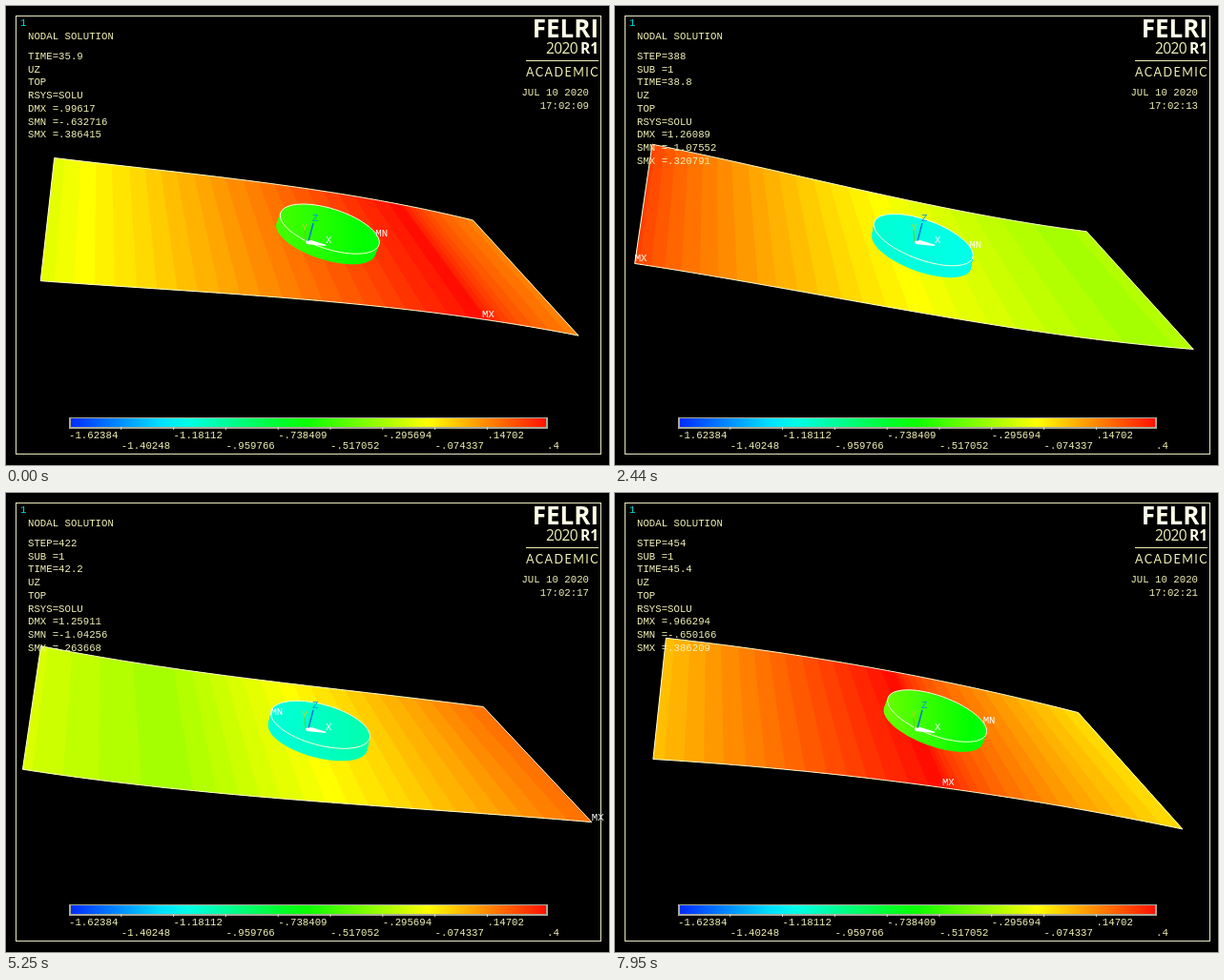
An HTML page with a canvas that plays this animation: 632x482 px, repeating every 7990 ms.

```html
<!DOCTYPE html>
<html lang="en">
<head>
<meta charset="utf-8">
<title>Nodal solution</title>
<style>
html, body { margin: 0; width: 100%; height: 100%; overflow: hidden; background: #000; }
canvas { display: block; }
</style>
</head>
<body>
<canvas id="stage" width="632" height="482"></canvas>
<script>
const ctx = document.getElementById("stage").getContext("2d");
const LOOP = 7990, STEP_MS = 83, FIRST = 359, LAST = 454;
const PERIOD = 5.1;               // wave period in solution seconds
const INK = "#f0f0b4", RIM = "#ffffd8";
const MONO = '10.7px "Liberation Mono", monospace';
const SANS = '"Open Sans", sans-serif';

const clamp = (v, a, b) => Math.max(a, Math.min(b, v));
const mix = (a, b, p) => a + (b - a) * p;
const phaseAt = step => (step - FIRST) / 10 / PERIOD * 360;

// Everything swings with one wave; each part peaks at its own phase in degrees.
function poseAt(phase) {
  const swing = (mean, size, peak) => mean + size * Math.cos((phase - peak) * Math.PI / 180);
  return {
    topLeft: [swing(43, 10.5, 317), swing(153.5, 9, 48)],
    topRight: [swing(493.5, 8.2, 120), swing(230, 7.2, 225)],
    bottomLeft: [swing(26, 14, 317), swing(281, 11.5, 48)],
    bottomRight: [swing(605.3, 10.5, 120), swing(352.3, 8.7, 225)],
    sagLeft: swing(0, 7, 135),
    sagRight: swing(0, 7.8, 155),
    cx: swing(330.5, 9, 348),
    cy: swing(240.8, 7.4, 155),
    tilt: swing(14.5, 2.6, 260),
    depth: swing(12, 1.5, 130),
    lean: swing(-3, 1.2, 160),
    level: swing(.38, .17, 330),
    slope: swing(.03, .09, 300),
    max: swing(1.16, .2, 145)
  };
}

// Colour level along the plate: a travelling crest, steeper ahead than behind.
function fieldAt(phase, u) {
  const a = (((phase - 212 - 180 * u + 180) % 360) + 360) % 360 - 180;
  if (a >= 0) return .99 - .0018 * a;
  return .66 + .28 * Math.pow(1 + a / 180, 1.4) + .05 * Math.exp(a / 6);
}

function color(s) {
  const i = clamp(s, 0, 1) * 4;
  const rgb = i < 1 ? [0, i, 1] : i < 2 ? [0, 1, 2 - i] : i < 3 ? [i - 2, 1, 0] : [1, 4 - i, 0];
  return `rgb(${rgb.map(v => Math.round(v * 255))})`;
}

// Six significant digits at most, without the leading zero.
function short(v) {
  const n = Number(Math.abs(v) < 1 ? v.toFixed(6) : v.toPrecision(6));
  return String(n).replace(/^(-?)0\./, "$1.");
}

function text(str, x, y, fill = INK, font = MONO, align = "left", spacing = 0) {
  ctx.font = font;
  ctx.fillStyle = fill;
  ctx.textAlign = align;
  ctx.letterSpacing = spacing + "px";
  ctx.fillText(str, x, y);
}

function trace(points, close = false) {
  ctx.beginPath();
  points.forEach(([x, y]) => ctx.lineTo(x, y));
  if (close) ctx.closePath();
}

function fill(points, style) {
  trace(points);
  ctx.fillStyle = style;
  ctx.fill();
}

function line(points, style, width = 1, close = false) {
  trace(points, close);
  ctx.strokeStyle = style;
  ctx.lineWidth = width;
  ctx.stroke();
}

// Draws the plate and returns the crest's position on the plate.
function drawPlate(pose, phase) {
  const N = 240, upper = [], lower = [];
  const edge = (from, to, bend) => u => {
    const curve = 13.5 * u * (1 - u) * mix(pose.sagLeft, pose.sagRight, 3 * u - 1) / 3;
    return [mix(from[0], to[0], u), mix(from[1], to[1], u) + bend * curve];
  };
  const top = edge(pose.topLeft, pose.topRight, 1);
  const bottom = edge(pose.bottomLeft, pose.bottomRight, 1.3);
  const field = u => fieldAt(phase, u);

  for (let i = 0; i < N; i++) {
    const u = i / N, v = Math.min(1, (i + 2) / N);
    const shade = color(Math.round(field(u + .5 / N) * 80) / 80);
    fill([top(u), top(v), bottom(v), bottom(u)], shade);
  }
  let peak = 0;
  for (let i = 0; i <= N; i++) {
    const u = i / N;
    upper.push(top(u));
    lower.unshift(bottom(u));
    if (field(u) > field(peak)) peak = u;
  }
  line(upper.concat(lower), RIM, 1, true);
  return { at: bottom(peak), level: field(peak) };
}

function drawDisc(pose) {
  const W = 52, H = 22;
  const oval = k => Array.from({ length: 60 }, (_, i) => {
    const a = i * Math.PI / 30, c = Math.cos(a);
    return [
      pose.cx + pose.lean * k + W * c,
      pose.cy + pose.depth * k + pose.tilt * c + H * Math.sin(a)
    ];
  });
  const shade = ctx.createLinearGradient(pose.cx - W, 0, pose.cx + W, 0);
  for (let i = 0; i <= 6; i++) {
    shade.addColorStop(i / 6, color(pose.level + pose.slope * (.5 - i / 6)));
  }
  for (let k = 16; k >= 0; k--) fill(oval(k / 16), shade);
  line(oval(0), RIM, 1, true);
}

function drawTriad() {
  line([[317, 247], [322, 228]], "#0878d8", 1.5);
  line([[314, 248], [313, 235]], "#60d020");
  fill([[314, 247], [320, 246], [336, 251], [334, 252], [315, 250]], "#fff");
  text("X", 335, 249, "#f8f8f8");
  text("Z", 321, 226, "#0898e0");
  text("Y", 310, 236, "#b8d820");
}

function drawLabels(pose, crest) {
  const side = pose.slope > 0 ? 1 : -1;
  text("MN", pose.cx - 2 + 50 * side, pose.cy - 1 + 9 * side, "#fff");
  text("MX", crest.at[0], crest.at[1] - 2, "#fff");
}

function drawLegend() {
  const gap = 54.8;
  const bar = ctx.createLinearGradient(67, 0, 567, 0);
  for (let i = 0; i <= 16; i++) bar.addColorStop(i / 16, color(mix(.04, .985, i / 16)));
  ctx.fillStyle = "#a8a898";
  ctx.fillRect(66, 432, 502, 12);
  ctx.fillStyle = bar;
  ctx.fillRect(68, 433, 498, 9);
  for (let i = 0; i < 9; i++) {
    const x = 66 + i * gap;
    if (i) line([[x, 442], [x, 445]], "#d8d8c8");
    text(short(-1.6238385 + i * .22135735), x, i % 2 ? 465 : 454);
  }
  text(".4", 567, 465);
}

function drawReadout(pose, crest, step) {
  const low = pose.level - Math.abs(pose.slope) / 2;
  const rows = [
    `TIME=${step / 10}`, "UZ", "TOP", "RSYS=SOLU",
    `DMX =${short(pose.max)}`,
    `SMN =${short(-1.62384 + 2.02384 * low)}`,
    `SMX =${short(.4 - 1.3 * (1 - Math.min(crest.level, .993)))}`
  ];
  if (step > FIRST) rows.unshift(`STEP=${step}`, "SUB =1");
  text("1", 15, 21, "#00e0e0");
  text("NODAL SOLUTION", 23, 35);
  rows.forEach((row, i) => text(row, 23, 56 + i * 13.7));
}

function drawTitle(step) {
  const seconds = 9 + Math.floor((step - FIRST) / 8.2 + .7);
  text("FELRI", 621, 33, "#ffffe8", `bold 26px ${SANS}`, "right");
  text("R1", 621, 50, "#ffffe8", `bold 15.5px ${SANS}`, "right");
  text("2020", 599, 50, INK, `15.5px ${SANS}`, "right", -.6);
  line([[545, 57.5], [621, 57.5]], INK);
  text("ACADEMIC", 545, 74, INK, "12.5px Lato, sans-serif", "left", 1.5);
  text("JUL 10 2020", 611, 94, INK, MONO, "right");
  text("17:02:" + String(seconds).padStart(2, "0"), 611, 108, INK, MONO, "right");
}

function draw(ms) {
  const step = Math.min(LAST, FIRST + Math.floor((ms % LOOP) / STEP_MS));
  const phase = phaseAt(step), pose = poseAt(phase);

  ctx.fillStyle = "#000";
  ctx.fillRect(0, 0, 632, 482);
  ctx.strokeStyle = "#e8e8c0";
  ctx.lineWidth = 1;
  ctx.strokeRect(10.5, 10.5, 613, 460);
  const crest = drawPlate(pose, phase);
  drawDisc(pose);
  drawTriad();
  drawLabels(pose, crest);
  drawLegend();
  drawReadout(pose, crest, step);
  drawTitle(step);
}

const start = performance.now();
function tick() {
  draw(performance.now() - start);
  requestAnimationFrame(tick);
}
tick();
</script>
</body>
</html>
```
